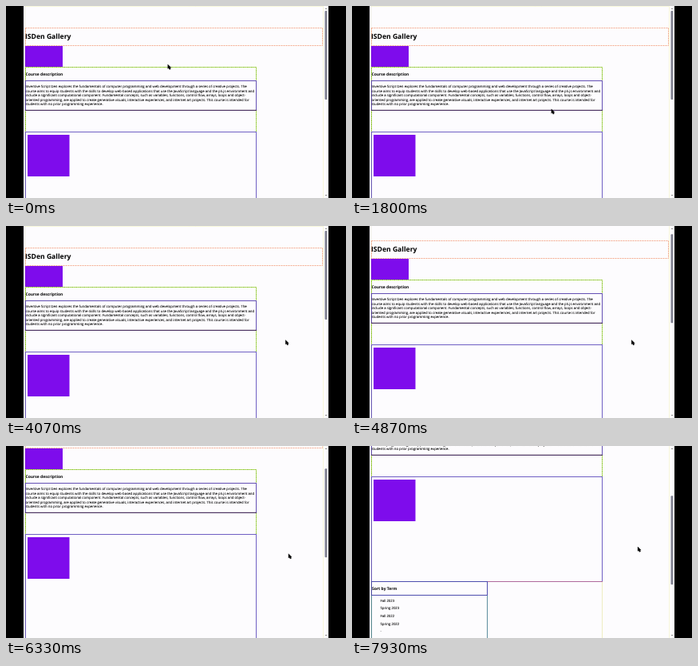
Write an HTML page that moves like this. It is 426 by 240 pixels and loops after 8 s.

```html
<!DOCTYPE html>
<html lang="en">
<head>
<meta charset="utf-8">
<title>Gallery page</title>
<style>
  html, body { margin: 0; width: 100%; height: 100%; overflow: hidden; background: #000; }
  svg { display: block; width: 100vw; height: 100vh; }
  text { font: 4.3px "Open Sans", "Noto Sans", sans-serif; fill: #080808; text-rendering: geometricPrecision; white-space: pre; }
  .title { font-size: 8.6px; font-weight: 700; fill: #000; }
  .heading { font-size: 5px; font-weight: 700; fill: #000; }
  .body { stroke: #080808; stroke-width: .08px; }
</style>
</head>
<body>
<svg viewBox="0 0 426 240">
  <defs><clipPath id="screen"><rect x="22" width="382" height="240"/></clipPath></defs>
  <rect width="426" height="240"/>
  <g clip-path="url(#screen)">
    <rect x="22" width="382" height="240" fill="#fdfcfe"/>
    <g id="page"></g>
    <path d="M399.8 4L401 2.4L402.2 4ZM399.8 236L401 237.6L402.2 236Z" fill="#777"/>
    <rect id="thumb" x="399.5" y="6" width="2.8" height="111" rx="1" fill="#7f8090"/>
    <path id="cursor" d="M0 0V5.4L1.2 4.5L2.1 6.4L3.6 5.8L2.9 4.1H4.2Z" fill="#000" stroke="#000" stroke-width=".3"/>
  </g>
</svg>
<script>
const $ = id => document.getElementById(id);
const page = $('page');

function add(tag, attrs, content = '') {
  const node = document.createElementNS('http://www.w3.org/2000/svg', tag);
  for (const key in attrs) node.setAttribute(key, attrs[key]);
  node.textContent = content;
  page.append(node);
}

const box = (x, y, right, bottom, stroke, dash = 'none') => add('rect', {
  x: x + .5, y: y + .5, width: right - x - 1, height: bottom - y - 1,
  fill: 'none', stroke, 'stroke-dasharray': dash
});
const line = (x, y, right, stroke) => add('path', { d: `M${x} ${y}H${right}`, stroke });
const block = (x, y, width, height) => add('rect', { x, y, width, height, fill: '#7e0cec' });
const label = (x, y, string, kind = 'body') => add('text', { x, y, class: kind }, string);

// Nested layout outlines
box(23, 0, 398, 480, '#f0f0b4', '1 1');
box(24, 76, 314, 480, '#dede86', '1 1');
box(24, 27, 397, 50, '#f4ac90', '2 1');
box(24, 76, 314, 158, '#94cc3c', '2 .5');
box(24, 93, 314, 131, '#6450b4');
line(24, 130.3, 314, '#493052');
box(24, 157, 314, 289, '#7060c4');
line(169, 288.5, 314, '#b06a9c');
box(24, 288, 170, 480, '#5d8e9e');
box(24, 288, 170, 306, '#4e4eae');

block(24, 50, 47, 26);
block(27, 161, 52.5, 52);

label(24, 41.3, 'ISDen Gallery', 'title');
label(24.5, 86.7, 'Course description', 'heading');
[
  'Inventive Script Den explores the fundamentals of computer programming and web development through a series of creative projects. The',
  'course aims to equip students with the skills to develop web-based applications that use the JavaScript language and the p5.js environment and',
  'include a significant computational component. Fundamental concepts, such as variables, functions, control flow, arrays, loops and object-',
  'oriented programming, are applied to create generative visuals, interactive experiences, and internet art projects. This course is intended for',
  'students with no prior programming experience.'
].forEach((text, i) => label(24.5, 101.9 + i * 5.6, text));

label(25, 298.5, 'Sort by Term', 'heading');
['Fall 2023', 'Spring 2023', 'Fall 2022', 'Spring 2022', '-']
  .forEach((term, i) => label(35.5, 313.8 + i * 9.6, term));

// Tracks: [time, ...values]
const scrollTrack = [[4500, 0], [5600, 26], [7000, 67], [7930, 118.5]];
const cursorTrack = [
  [300, 202.7, 73], [1700, 249.8, 128.8], [1900, 249.8, 128.8],
  [2600, 350.2, 142.5], [6000, 350.2, 142.5], [6700, 358, 126]
];

function sample(track, time) {
  const next = track.findIndex(step => step[0] > time);
  if (next < 0) return track.at(-1).slice(1);
  if (next === 0) return track[0].slice(1);
  const from = track[next - 1], to = track[next];
  const part = (time - from[0]) / (to[0] - from[0]);
  return from.slice(1).map((value, i) => value + (to[i + 1] - value) * part);
}

const LOOP = 8000, FPS = 15;
const start = performance.now();

function draw(now) {
  const elapsed = Math.max(0, now - start) % LOOP;
  const time = Math.floor(elapsed * FPS / 1000 + .1) * 1000 / FPS;
  const scroll = Math.round(sample(scrollTrack, time)[0]);
  page.setAttribute('transform', `translate(0 ${-scroll})`);
  $('thumb').setAttribute('y', 6 + scroll * .473);
  $('cursor').setAttribute('transform', `translate(${sample(cursorTrack, time).join(' ')})`);
  requestAnimationFrame(draw);
}
draw(start);
</script>
</body>
</html>
```
